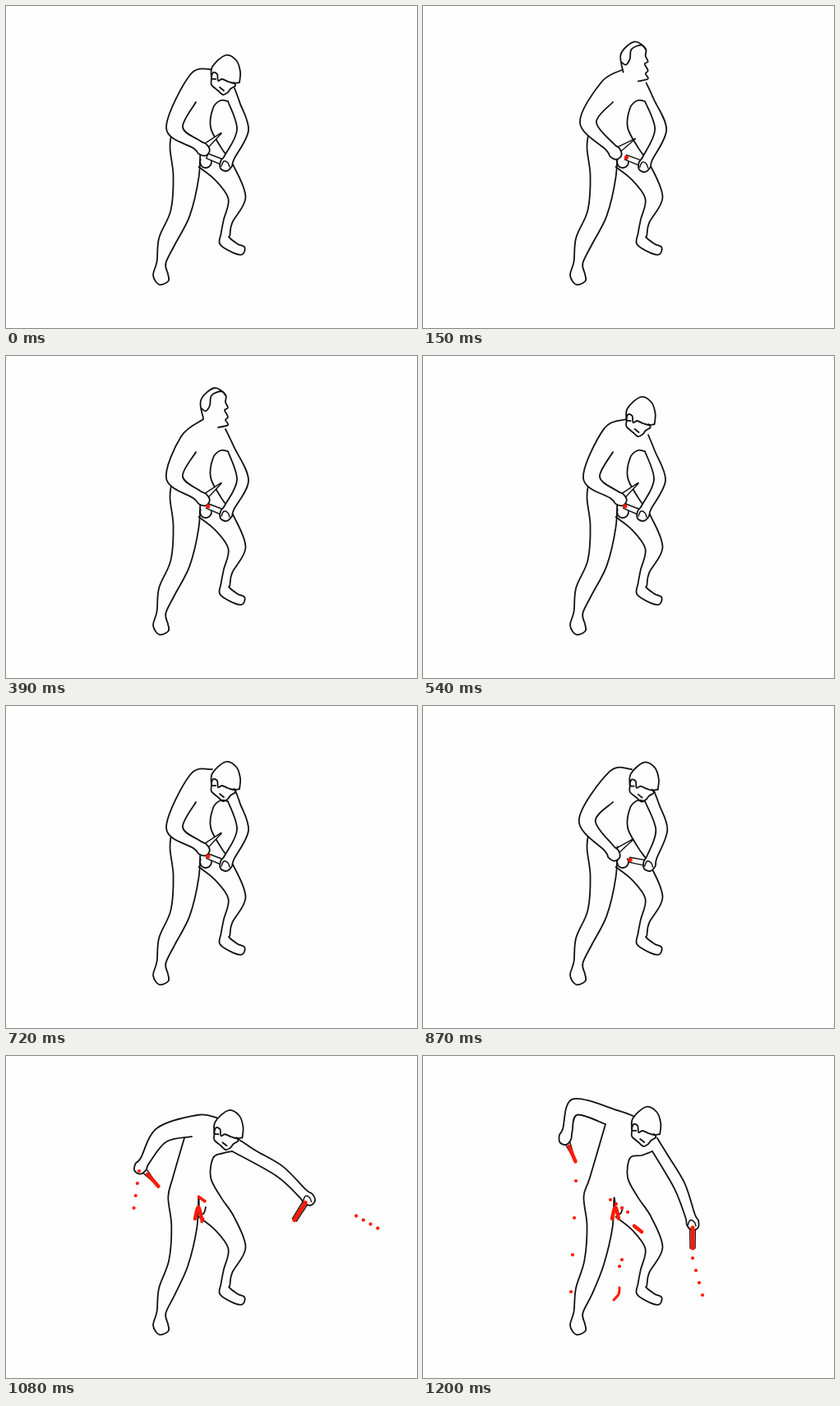
These frames come from a looping animation (500 px wide and 392 px high, 1.23 s). An HTML page with a canvas:

```html
<!DOCTYPE html>
<html lang="en">
<head>
<meta charset="utf-8">
<title>Line figure</title>
<style>
html, body { margin: 0; height: 100%; overflow: hidden; background: #fefefe; }
canvas { display: block; }
</style>
</head>
<body>
<canvas id="stage" width="500" height="392"></canvas>
<script>
const ctx = document.getElementById('stage').getContext('2d');
const LOOP = 1230, STEP = 30, TEAR = 900, RELEASE = 1020;
const INK = '#111', PAPER = '#fefefe', RED = '#ff1a08';

// Joints: elbow and hand of each arm, angles of the held things, lift of the knife arm.
const poses = {
  cut: { elbowL: [205, 148], handL: [239, 174], elbowR: [288, 151], handR: [268, 192], held: [-0.7, 3.53], lift: [0] },
  pull: { elbowL: [198, 137], handL: [229, 181], elbowR: [290, 150], handR: [271, 194], held: [-0.5, 3.5], lift: [0] },
  tear: { elbowL: [196, 133], handL: [226, 184], elbowR: [292, 151], handR: [281, 192], held: [-0.58, 3.2], lift: [0] },
  fling: { elbowL: [190, 100], handL: [163, 139], elbowR: [335, 138], handR: [372, 170], held: [0.8, 2.2], lift: [0.5] },
  end: { elbowL: [185, 62], handL: [173, 99], elbowR: [312, 158], handR: [328, 203], held: [1.17, 1.57], lift: [1] }
};
const acts = [[0, 'cut'], [270, 'pull'], [390, 'cut'], [720, 'cut'], [990, 'tear'], [1050, 'fling'], [1200, 'end']];
// Neck position and height of the bowed head.
const bows = [[0, [251, 0]], [270, [240, -12]], [390, [240, -12]], [540, [247, -10]],
  [720, [251, 8]], [990, [256, 9]], [1200, [258, 2]]];

const mix = (a, b, k) => a.map((v, i) => v + (b[i] - v) * k);
const along = ([x, y], angle, r) => [x + r * Math.cos(angle), y + r * Math.sin(angle)];

function between(keys, time, blend) {
  const i = keys.findIndex(key => key[0] > time);
  if (i < 0) return blend(keys.at(-1)[1], keys.at(-1)[1], 0);
  const [t0, a] = keys[i - 1], [t1, b] = keys[i], k = (time - t0) / (t1 - t0);
  return blend(a, b, k * k * (3 - 2 * k));
}

function blendPoses(a, b, k) {
  const pose = {};
  for (const part in poses[a]) pose[part] = mix(poses[a][part], poses[b][part], k);
  return pose;
}

// Smooth curve through all points.
function curve(pts, { fill, color = INK, width = 1.8 } = {}) {
  ctx.beginPath();
  ctx.moveTo(...pts[0]);
  for (let i = 0; i < pts.length - 1; i++) {
    const b = pts[i], c = pts[i + 1], a = pts[i - 1] || b, d = pts[i + 2] || c;
    ctx.bezierCurveTo(b[0] + (c[0] - a[0]) / 6, b[1] + (c[1] - a[1]) / 6,
      c[0] - (d[0] - b[0]) / 6, c[1] - (d[1] - b[1]) / 6, ...c);
  }
  if (fill) { ctx.fillStyle = fill; ctx.fill(); }
  ctx.strokeStyle = color;
  ctx.lineWidth = width;
  ctx.stroke();
}

// Outline around a chain of joints [x, y, half width]; the root only gives direction.
function limb(root, joints, lead, tail, fill) {
  const down = [], up = [];
  joints.forEach(([x, y, w], i) => {
    const from = joints[i - 1] || root, to = joints[i + 1] || [x, y];
    const dx = to[0] - from[0], dy = to[1] - from[1], r = w / Math.hypot(dx, dy);
    down.push([x - dy * r, y + dx * r]);
    up.unshift([x + dy * r, y - dx * r]);
  });
  curve([...lead, ...down, ...up, ...tail], { fill });
}

function arm(root, elbow, hand, thickness, lead, tail) {
  const angle = Math.atan2(hand[1] - elbow[1], hand[0] - elbow[0]);
  const joints = [[...elbow, thickness], [...along(hand, angle, -9), 6], [...hand, 7.5], [...along(hand, angle, 8), 4]];
  limb(root, joints, lead, tail, PAPER);
}

// Tapered bar held in a hand.
function bar(hand, angle, length, thick, tip) {
  const end = along(hand, angle, length), side = angle + Math.PI / 2;
  ctx.beginPath();
  for (const [p, r] of [[hand, thick], [end, tip], [end, -tip], [hand, -thick]]) ctx.lineTo(...along(p, side, r));
  ctx.closePath();
  ctx.fillStyle = PAPER;
  ctx.fill();
  ctx.strokeStyle = INK;
  ctx.lineWidth = 1.4;
  ctx.stroke();
}

function dot(x, y, r) {
  ctx.beginPath();
  ctx.arc(x, y, r, 0, 7);
  ctx.fillStyle = RED;
  ctx.fill();
}

const red = (pts, width = 4.5) => curve(pts, { color: RED, width });

function drawLegs(lift, pit) {
  const sway = 4 * lift;
  limb([218, 150],
    [[218 - sway, 172, 18.5], [219 - sway, 208, 15.5], [212 - sway, 252, 12], [196, 286, 10.5],
      [189, 312, 5.5], [188, 327, 9], [192, 337, 6]],
    [[213 + 9 * lift, 113 - 30 * lift], [203, 148]], [[236 - sway / 2, 187]]);
  limb([238, 172],
    [[248, 184, 18], [266, 204, 14], [281, 234, 10.5], [270, 262, 5.5], [267, 278, 5.5],
      [266, 286, 7], [279, 295, 6], [289, 298, 4.5]],
    [], [[249, 148], [252, 124], [261 + 5 * lift, 115 + 6 * lift], pit]);
}

function drawBowedHead() {
  curve([[250, 89], [251, 74], [267, 60], [280, 66], [285, 80], [284, 93]], { fill: PAPER });
  curve([[284, 93], [277, 94], [270, 92], [263, 89], [258, 91], [257, 83], [252, 81], [250, 88], [255, 89]]);
  curve([[250, 89], [250, 96], [258, 103]]);
  curve([[258, 103], [264, 108], [270, 105], [273, 101], [279, 97], [277, 93]]);
  curve([[260, 99], [265, 103]]);
}

function drawRaisedHead() {
  curve([[240, 76], [237, 54], [253, 39], [267, 47], [267, 56], [270, 63], [266, 66], [270, 74],
    [267, 78], [270, 84], [258, 87]], { fill: PAPER });
  curve([[238, 64], [243, 67], [248, 60], [250, 48], [262, 43], [267, 48]]);
}

// Streams of drops: source, first end place, step from drop to drop, sideways throw.
const streams = [
  { source: [170, 150], first: [186, 152], step: [-2, 45], thrown: -15, count: 4 },
  { source: [238, 186], first: [228, 175], step: [7, 5], thrown: 0, count: 4 },
  { source: [238, 190], first: [242, 248], step: [-3, 8], thrown: 0, count: 2 },
  { source: [375, 185], first: [328, 246], step: [4, 15], thrown: 75, count: 4 }
];

function drawStreams(time) {
  const k = (time - RELEASE) / (1200 - RELEASE), arc = 4 * k * (1 - k);
  for (const { source, first, step, thrown, count } of streams)
    for (let i = 0; i < count; i++) {
      const [x, y] = mix(source, first.map((v, axis) => v + i * step[axis]), k);
      dot(x + thrown * arc * (1 + i / 9), y - 12 * arc, 2.1);
    }
}

function draw(time) {
  const { elbowL, handL, elbowR, handR, held: [knife, piece], lift: [lift] } = between(acts, time, blendPoses);
  const [neck, headY] = between(bows, time, mix);
  const lean = neck - 240, torn = time >= TEAR, flung = time >= RELEASE;

  const neckL = [neck, 77 - 3 * lift], shoulderL = [neck - 27 + 7 * lift, 98 - 1.3 * lean - 8 * lift];
  const pitL = mix([231, 117], [222, 83], lift);
  const neckR = [neck + 27, 89 + lean - 7 * lift], pitR = [270 + 9 * lift, 116];
  const [sx, sy] = mix(neckR, elbowR, 0.35), shoulderR = [sx + 3, sy];

  ctx.fillStyle = PAPER;
  ctx.fillRect(0, 0, 500, 392);
  drawLegs(lift, pitR);

  if (flung) curve([[236, 194], [241, 191], [243, 184]]);
  else {
    ctx.beginPath();
    ctx.arc(...(torn ? [253, 196, 4] : [243, 190, 7]), -0.6, 3.6);
    ctx.stroke();
  }
  bar(handR, piece, torn ? 31 : 25, 3.5, 3);
  arm(mix(shoulderR, pitR, 0.5), elbowR, handR, 7, [pitR], [shoulderR, neckR]);
  curve([[-6, 3], [-3, -3], [2, -1], [4, 4]].map(([x, y]) => [handR[0] + x, handR[1] + y]), { width: 1.4 });
  bar(handL, knife, 30, 4, 0.3);
  arm(mix(shoulderL, pitL, 0.5), elbowL, handL, 10, [neckL, shoulderL], [pitL]);

  const raised = time >= 150 && time < 480;
  ctx.save();
  ctx.translate(...(raised ? [lean * 0.8, lean] : [(neck - 251) * 0.6, headY]));
  raised ? drawRaisedHead() : drawBowedHead();
  ctx.restore();

  if (flung) {
    red([along(handL, knife, 12), along(handL, knife, 32)]);
    red([along(handR, piece, 6), along(handR, piece, 31)], 5);
    red([[230, 198], [234, 184], [238, 198]]);
    if (time > 1110) {
      red([[257, 207], [266, 214]]);
      red([[239, 282], [238, 290], [232, 297]], 3);
    }
    drawStreams(time);
  } else if (torn) {
    dot(239, 181, 3);
    dot(238, 187, 2.8);
    dot(...along(handR, piece, 31), 3.2);
  } else if (time >= 150) {
    dot(...along(handR, piece, 24), 2.6);
  }
}

ctx.lineCap = ctx.lineJoin = 'round';
function tick() {
  draw(Math.floor(performance.now() % LOOP / STEP) * STEP);
  requestAnimationFrame(tick);
}
tick();
</script>
</body>
</html>
```
